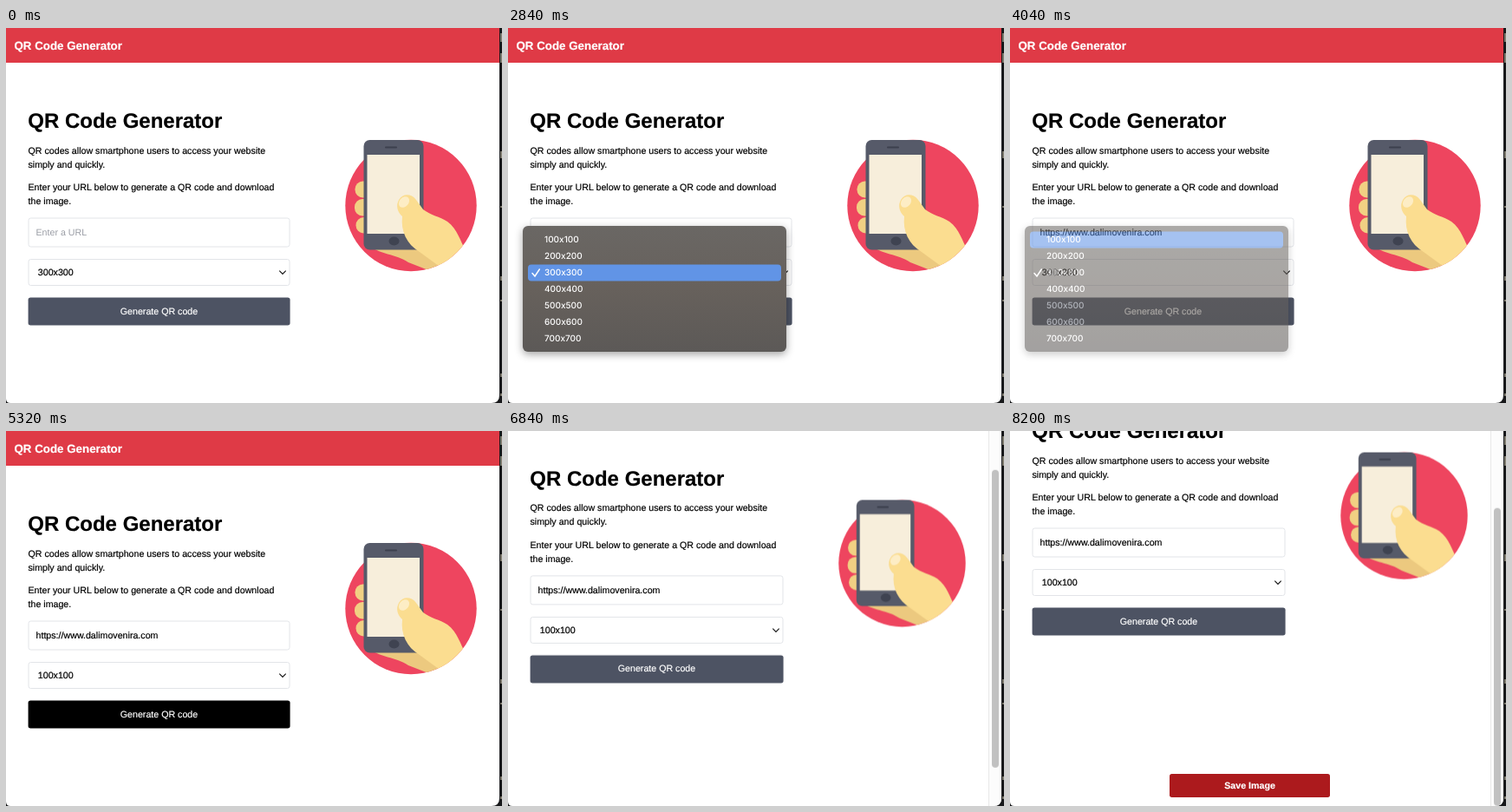
Write an HTML page that moves like this. It is 572 by 432 pixels and loops after 8480 ms.

```html
<!DOCTYPE html>
<html lang="en">
<head>
<meta charset="utf-8">
<title>QR Code Generator</title>
<style>
  html, body { margin: 0; width: 100%; height: 100%; overflow: hidden; background: #fff; }
  svg { display: block; }
  text {
    font: 10.67px "Liberation Sans", Arial, sans-serif; text-rendering: geometricPrecision;
    fill: #000; stroke: #000; stroke-width: .2px;
  }
  .mid { text-anchor: middle; }
  .bold { font-weight: 700; }
  .light { fill: #fff; stroke: #fff; }

  /* every animation shares one 8.48 s clock */
  .step { animation: 8.48s step-end infinite; }
  .flow { animation: 8.48s linear infinite; }

  .bar { width: 569px; animation-name: bar; }
  .field { width: 301px; height: 33px; fill: #fff; stroke: #e2e4e8; }
  .field { animation-name: narrow; }
  .button { width: 302px; fill: #4d5363; animation-name: shrink, press; }
  .chevron { animation-name: chevron; }
  .label { animation-name: label; }
  .art { transform-origin: 467px 204.5px; animation-name: art; }
  @keyframes bar { 63.67% { width: 554px; } }
  @keyframes narrow { 63.67% { width: 291px; } }
  @keyframes shrink { 63.67% { width: 292px; } }
  @keyframes chevron { 63.67% { transform: translateX(-10px); } }
  @keyframes label { 63.67% { transform: translateX(-5px); } }
  @keyframes art { 63.67% { transform: translate(-12.5px, 0) scale(.967); } }
  @keyframes press { 50% { fill: #000; } 73.58% { fill: #4d5363; } }

  .hint { fill: #9a9da5; stroke: none; animation-name: hint; }
  .url, .later, .scrollbar, .spinner, .save, .caret, .endcaret { visibility: hidden; }
  .url { animation-name: url; }
  .caret { animation-name: caret; }
  .endcaret { animation-name: endcaret; }
  .first { animation-name: first; }
  .later { animation-name: later; }
  @keyframes hint { 25% { visibility: hidden; } }
  @keyframes url { 25% { visibility: visible; } }
  @keyframes caret {
    11.32% { visibility: visible; } 16.98% { visibility: hidden; }
    22.4% { visibility: visible; } 25% { visibility: hidden; }
  }
  @keyframes endcaret { 25% { visibility: visible; } 31.6% { visibility: hidden; } }
  @keyframes first { 50% { visibility: hidden; } }
  @keyframes later { 50% { visibility: visible; } }

  .menu { opacity: 0; filter: drop-shadow(0 3px 5px rgba(0, 0, 0, .36)); animation-name: menu; }
  .menu text { font: 500 10px Inter, sans-serif; fill: #fff; stroke: none; }
  .pick { fill: #6194e6; animation-name: pick; }
  @keyframes menu {
    0%, 31.59% { opacity: 0; } 31.6%, 45.75% { opacity: 1; }
    47.64% { opacity: .57; } 50%, 100% { opacity: 0; }
  }
  @keyframes pick {
    36.79% { transform: translateY(-19px); }
    38.68% { transform: translateY(-38px); }
    43.87% { transform: translateY(-38px); opacity: 0; }
    44.81% { transform: translateY(-38px); opacity: 1; }
  }

  .spinner { animation-name: spinner; }
  .ring { transform-origin: 274.3px 454px; animation-name: spin; }
  .save { animation-name: save; }
  .savebox { fill: #df3a46; animation-name: hover; }
  @keyframes spinner { 63.67% { visibility: visible; } 75.47% { visibility: hidden; } }
  @keyframes spin { 0%, 63.5% { transform: rotate(0); } 75.47%, 100% { transform: rotate(360deg); } }
  @keyframes save { 75.94% { visibility: visible; } }
  @keyframes hover { 95.75% { fill: #ac1a1d; } }

  .page { animation-name: scroll; }
  .scrollbar { animation-name: scrollbar; }
  .thumb { height: 377px; animation-name: size; }
  .slide { animation-name: slide; }
  @keyframes scroll {
    0%, 73.11% { transform: translateY(0); } 75% { transform: translateY(-12px); }
    80.66% { transform: translateY(-52px); }
    83.49% { transform: translateY(-79px); animation-timing-function: ease-out; }
    86.79%, 100% { transform: translateY(-107px); }
  }
  @keyframes scrollbar { 63.67% { visibility: visible; } }
  @keyframes size { 75.47% { height: 343px; } }
  @keyframes slide {
    0%, 73.11% { transform: translateY(0); } 75% { transform: translateY(10.5px); }
    80.66% { transform: translateY(41.7px); }
    83.49% { transform: translateY(63.3px); animation-timing-function: ease-out; }
    86.79%, 100% { transform: translateY(85.7px); }
  }
</style>
</head>
<body>
<svg width="572" height="432" viewBox="0 0 572 432">
  <defs>
    <clipPath id="window"><path d="M0 0H569V423Q569 432 560 432H5Q0 432 0 427Z"/></clipPath>
    <clipPath id="disc"><circle cx="467" cy="204.5" r="75.7"/></clipPath>
    <linearGradient id="glass" x2="0" y2="1">
      <stop stop-color="#6a6764"/><stop offset=".5" stop-color="#67615c"/><stop offset="1" stop-color="#5c5957"/>
    </linearGradient>
  </defs>

  <rect width="572" height="432" fill="#17181a"/>
  <path d="M571 6V16M571 29V40M571 142V150M571 205V207M571 286V291M571 313V315M571 398V402M571 421V424" stroke="#a39c8c" stroke-width="1.5"/>

  <g clip-path="url(#window)">
    <rect width="569" height="432" fill="#fff"/>
    <g class="page flow">
      <rect class="bar step" height="40" fill="#df3a46"/>
      <text class="bold light" x="9.5" y="24.6" style="font-size:13.33px">QR Code Generator</text>
      <text class="bold" x="25.3" y="114.8" style="font-size:24px">QR Code Generator</text>
      <text x="25.5" y="144.6">QR codes allow smartphone users to access your website</text>
      <text x="25.5" y="160.6">simply and quickly.</text>
      <text x="25.5" y="187.2">Enter your URL below to generate a QR code and download</text>
      <text x="25.5" y="203.2">the image.</text>

      <rect class="field step" x="26" y="219" rx="2.5"/>
      <text class="hint step" x="34.5" y="238.7">Enter a URL</text>
      <text class="url step" x="34.5" y="238.7">https://www.dalimovenira.com</text>
      <rect class="caret step" x="34.3" y="229" width=".8" height="13"/>
      <rect class="endcaret step" x="176" y="229" width=".8" height="13"/>

      <rect class="field step" x="26" y="266.5" rx="2.5" style="height:30px"/>
      <text class="first step" x="36.8" y="285.2">300x300</text>
      <text class="later step" x="36.8" y="285.2">100x100</text>
      <path class="chevron step" d="M315.3 279.7L319 283.4L322.7 279.7" fill="none" stroke="#111" stroke-width="1.1"/>

      <rect class="button step" x="25.6" y="310.5" height="32" rx="2.7"/>
      <text class="label step mid light" x="176.5" y="329.6">Generate QR code</text>

      <g class="art step">
        <circle cx="467" cy="204.5" r="75.7" fill="#ee455f"/>
        <g clip-path="url(#disc)">
          <path d="M418 250C430 261 450 260 464 270L500 284L520 255L470 235Z" fill="#ecc97f"/>
        </g>
        <g fill="#f1d083">
          <rect x="402.5" y="176.5" width="20" height="19" rx="9"/>
          <rect x="402" y="197" width="20" height="19.5" rx="9"/>
          <rect x="403.5" y="218" width="20" height="18.5" rx="9"/>
        </g>
        <rect x="412.5" y="129" width="69" height="126.5" rx="7" fill="#565a69"/>
        <rect x="416.5" y="146" width="60.5" height="91" fill="#f7eedb"/>
        <path d="M438 137.5H450" stroke="#3c404e" stroke-width="2" stroke-linecap="round"/>
        <ellipse cx="447.5" cy="245.5" rx="6" ry="5" fill="#3f4351"/>
        <g clip-path="url(#disc)">
          <path d="M453 198C449 205 452 213 457 217C455 234 462 249 477 258L503 277L530 256C524 246 521 232 509 223C500 217 490 216 481 209L473 198C467 190 457 191 453 198Z" fill="#fbdd90"/>
        </g>
        <ellipse cx="459" cy="200.5" rx="7" ry="5.3" transform="rotate(-48 459 200.5)" fill="#fdedc5"/>
      </g>

      <g class="spinner step">
        <g class="ring flow" fill="none" stroke-width="5.8">
          <circle cx="274.3" cy="454" r="29.1" stroke="#4d5363"/>
          <path d="M266.3 426A29.1 29.1 0 0 1 302.1 445.5" stroke="#c7226c" stroke-linecap="round"/>
        </g>
      </g>

      <g class="save step">
        <rect class="savebox step" x="184" y="502" width="185" height="27" rx="2.7"/>
        <text class="bold mid light" x="276.5" y="518.8">Save Image</text>
      </g>
    </g>

    <g class="scrollbar step">
      <rect x="554" width="15" height="432" fill="#fcfcfc"/>
      <path d="M554.5 0V432" stroke="#e8e8e8"/>
      <g class="slide flow"><rect class="thumb step" x="558" y="3" width="8" rx="4" fill="#c1c1c1"/></g>
    </g>
  </g>

  <g class="menu flow">
    <rect x="17" y="228" width="304" height="145" rx="6" fill="url(#glass)"/>
    <rect class="pick step" x="23" y="272.5" width="292" height="19" rx="4"/>
    <path d="M28 282.5L31 286L36.3 278" fill="none" stroke="#fff" stroke-width="1.5" stroke-linecap="round"/>
    <g id="sizes"></g>
  </g>
</svg>
<script>
  const sizes = document.getElementById("sizes");
  for (let i = 1; i <= 7; i++) {
    const row = document.createElementNS("http://www.w3.org/2000/svg", "text");
    row.setAttribute("x", 42);
    row.setAttribute("y", 228 + 19 * i);
    row.textContent = `${i}00x${i}00`;
    sizes.append(row);
  }
</script>
</body>
</html>
```
